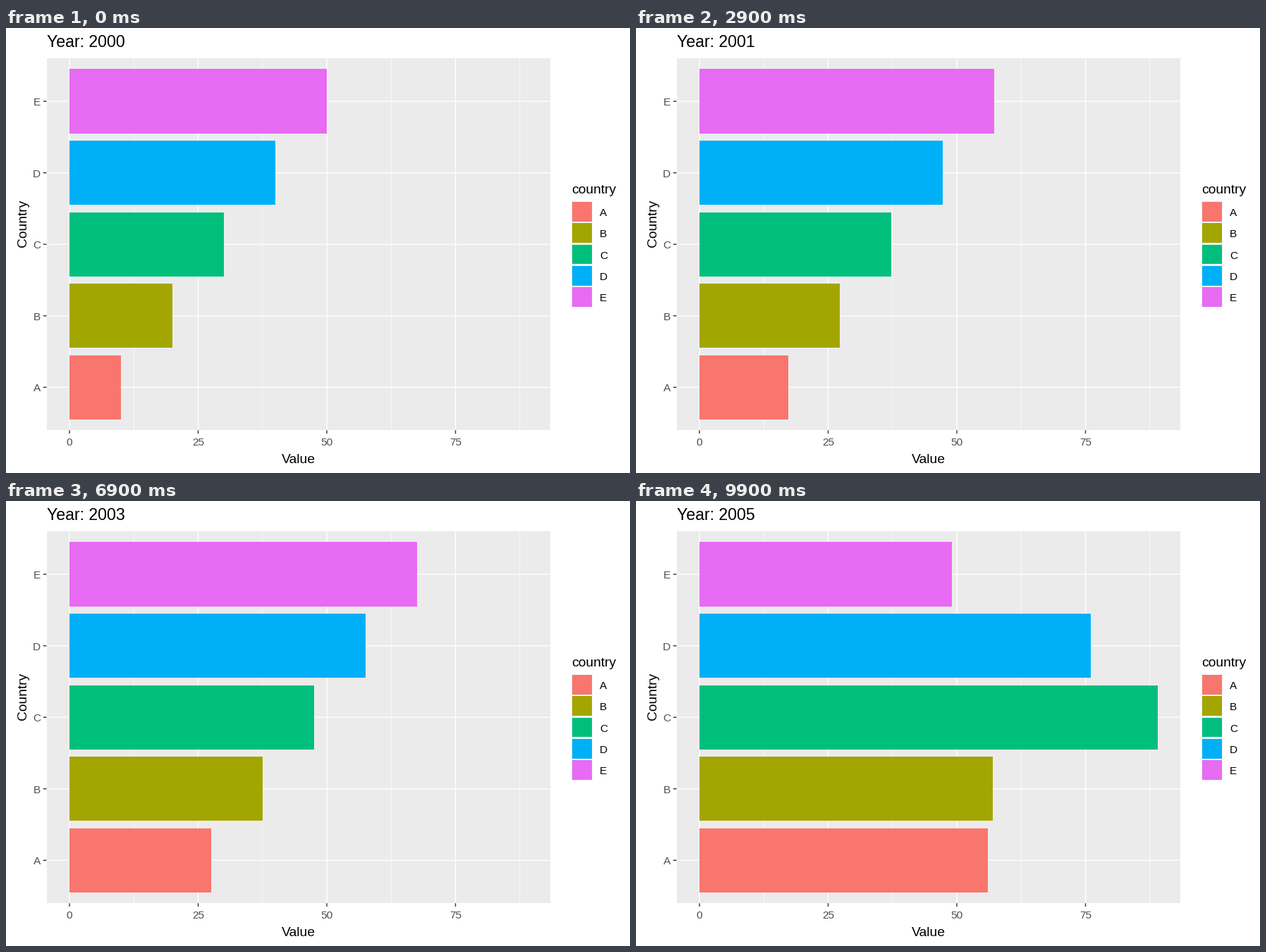
Animation, 885 px wide and 632 px high, one loop 10 s. Source, as a matplotlib script:

```python
import numpy as np
import matplotlib.pyplot as plt
from matplotlib.animation import FuncAnimation
from matplotlib.patches import Rectangle

W, H, DPI = 885, 632, 64
FRAMES, INTERVAL = 100, 100
PT = 126 / 72                      # layout points to pixels

NAMES = "ABCDE"
COLORS = ["#F8766D", "#A3A500", "#00BF7D", "#00B0F6", "#E76BF3"]
LAST = [56, 57, 89, 76, 49]        # values in the final year
YEARS = 5
KEYS = [round((FRAMES - 1) * y / YEARS) for y in range(YEARS + 1)]

LEFT, RIGHT, TOP, BOTTOM = 57.55, 772.2, 43.17, 571.23
X0, UNIT = 90.02, 7.3
PITCH = (BOTTOM - TOP) / 5.2
TICK = 2.75 * PT

plt.rcParams["font.family"] = "Liberation Sans"
fig = plt.figure(figsize=(W / DPI, H / DPI), dpi=DPI, facecolor="white")
ax = fig.add_axes([0, 0, 1, 1])
ax.set_xlim(0, W)
ax.set_ylim(H, 0)
ax.axis("off")


def px(value):
    return X0 + UNIT * value


def row(i):
    return BOTTOM - PITCH * (0.6 + i)


def rect(x0, y0, x1, y1, color, z):
    """Filled box with edges on whole pixels."""
    x0, y0, x1, y1 = (round(v) for v in (x0, y0, x1, y1))
    return ax.add_patch(Rectangle((x0, y0), x1 - x0, y1 - y0, facecolor=color,
                                  linewidth=0, antialiased=False, zorder=z))


def line(xs, ys, width, color="white", z=2):
    ax.plot(xs, ys, color=color, lw=width * 72 / DPI, zorder=z,
            solid_capstyle="butt", snap=False)


def text(x, y, s, size, color="black", **kw):
    return ax.text(x, y, s, fontsize=size * PT * 72 / DPI, color=color,
                   va="baseline", zorder=5, **kw)


# Panel, grid and ticks
rect(LEFT, TOP, RIGHT, BOTTOM, "#EBEBEB", 1)
for v in np.arange(12.5, 100, 25):
    line([px(v)] * 2, [TOP, BOTTOM], 0.7)
for i, name in enumerate(NAMES):
    y = row(i)
    line([LEFT, RIGHT], [y, y], 1.4)
    line([LEFT - TICK, LEFT], [y, y], 1.4, "#333333")
    text(49, y + 6, name, 8.8, "#4D4D4D", ha="right")
for v in (0, 25, 50, 75):
    line([px(v)] * 2, [TOP, BOTTOM], 1.4)
    line([px(v)] * 2, [BOTTOM, BOTTOM + TICK], 1.4, "#333333")
    text(px(v), 593, str(v), 8.8, "#4D4D4D", ha="center")

text((LEFT + RIGHT) / 2, 618, "Value", 11, ha="center")
text(24.5, (TOP + BOTTOM) / 2, "Country", 11, ha="center", rotation=90)
title = text(LEFT, 27, "", 13.2)

# Legend
KEY, INSET = 17.28 * PT, 1.24
text(802, 235, "country", 11)
for i, (name, color) in enumerate(zip(NAMES, COLORS)):
    x, y = 802, 246 + KEY * i
    rect(x, y, x + KEY, y + KEY, "#F2F2F2", 3)
    rect(x + INSET, y + INSET, x + KEY - INSET, y + KEY - INSET, color, 4)
    text(842, y + KEY / 2 + 6, name, 8.8)

bars = [rect(X0, row(i) - 0.45 * PITCH, X0, row(i) + 0.45 * PITCH, c, 4)
        for i, c in enumerate(COLORS)]


def update(frame):
    title.set_text(f"Year: {2000 + round(frame * YEARS / (FRAMES - 1))}")
    for i, bar in enumerate(bars):
        start = 10 * (i + 1)
        values = [start + 5 * y for y in range(YEARS)] + [LAST[i]]
        value = np.interp(frame, KEYS, values)
        bar.set_width(round(px(value)) - round(X0))
    return [title, *bars]


anim = FuncAnimation(fig, update, frames=FRAMES, interval=INTERVAL,
                     repeat=True, repeat_delay=0)
plt.show()
```
